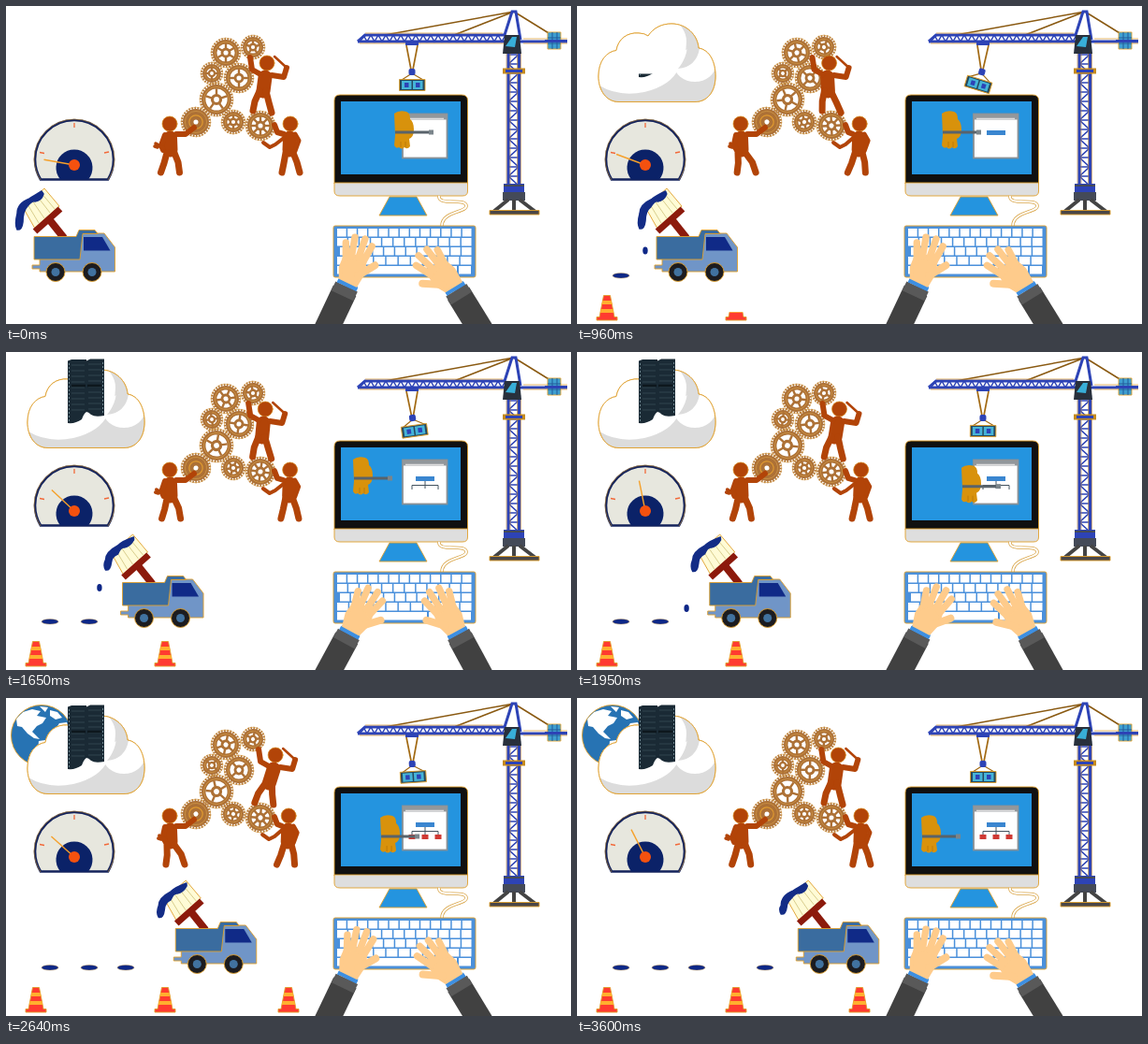
Write an HTML page that moves like this. It is 604 by 340 pixels and loops after 3.63 s.

```html
<!DOCTYPE html>
<html lang="en">
<head>
<meta charset="utf-8">
<title>Under construction</title>
<style>
html, body { margin: 0; width: 100%; height: 100%; overflow: hidden; background: #fff; }
svg { display: block; width: 604px; height: 340px; }
.gold { stroke: #e0a02c; stroke-width: .9; }
.man { stroke: #b24408; fill: none; stroke-linecap: round; stroke-linejoin: round; }
.man circle { fill: #b24408; stroke: #d98a1c; stroke-width: .7; }
</style>
</head>
<body>
<svg viewBox="0 0 604 340">
<defs id="defs">
  <path id="cloudShape" d="M45 102.500C31 102.500 23 90 23 75C23 58 32 49 42 47.500C44 35 54 28 66 29Q72 29 76 32C82 23 91 19 101 19C117 19 129 31 130 45C142 47 148 60 148 75C148 92 139 102.500 126 102.500Z"/>
  <clipPath id="inCloud"><use href="#cloudShape"/></clipPath>
  <clipPath id="inGlobe"><circle cx="38" cy="40" r="32"/></clipPath>
  <g id="cone">
    <path d="M-11 336V332.500H-8L-3.500 309.500H3.500L8 332.500H11V336Z" fill="#ff3b30" class="gold" stroke-width=".5"/>
    <path d="M-4.600 315H4.600L5.500 319H-5.500ZM-6.400 324H6.400L7.200 328H-7.200Z" fill="#ffb02e"/>
  </g>
  <g id="hand" fill="#fecb8b" stroke="#fecb8b" stroke-linecap="round" stroke-linejoin="round">
    <path d="M-8 2L-12 -14L-10 -29L11 -29L13 -14L8 2Z" stroke-width="4"/>
    <path d="M-9 -25L-13 -41M-3.500 -28L-5 -49M4 -28L6 -50M10 -26L15 -44" stroke-width="7.400"/>
    <path d="M8 -10L23 -25" stroke-width="8"/>
  </g>
</defs>

<g id="globe">
  <circle cx="38" cy="40" r="32.500" fill="#2773b3" class="gold"/>
  <g fill="#fff" clip-path="url(#inGlobe)">
    <path d="M11 22L18 15L28 12L37 14L33 19L43 21L39 27L33 30L28 36L32 40L36 44L30 43L23 38L17 31L12 30Z"/>
    <path d="M36 9L45 10L42 15ZM47 13L55 15L60 21L53 23L47 19Z"/>
    <path d="M35 46L42 45L48 52L43 60L38 67L34 56Z"/>
    <path d="M57 27L65 26L69 38L63 46L57 40L53 33Z"/>
  </g>
</g>
<g id="cloud"><use href="#cloudShape" fill="#fff" class="gold"/></g>
<g id="shade">
  <g clip-path="url(#inCloud)">
    <rect x="20" y="15" width="130" height="90" fill="#dcdcdc"/>
    <path d="M20 10H111Q124 42 109 66Q101 85 72 92Q44 98 22 84Z" fill="#fff"/>
    <ellipse cx="126" cy="63" rx="22" ry="18" fill="#fff"/>
    <path d="M109 19C121 32 121 52 108 67Q128 65 131 45Q131 24 109 19Z" fill="#dcdcdc"/>
  </g>
  <use href="#cloudShape" fill="none" class="gold"/>
</g>
<g id="server">
  <path d="M66 9.500L70 8H86V64Q83 66 81 72Q74 77 66 76ZM86 9.500L90 7.500H105V68Q95 70 91 67Q88 64 86 64Z" fill="#1a2a35"/>
  <path id="slats" stroke="#31444f" fill="none"/>
  <path d="M67.500 12V74M103.500 11V66" stroke="#7d98a3" stroke-width=".8" stroke-dasharray="2 2"/>
  <path d="M70 36H85M87 36H102" stroke="#0d171d" stroke-width="2.500"/>
</g>

<path d="M37 185.500A42 42 0 0 1 31 164A42 42 0 0 1 115 164A42 42 0 0 1 109 185.500Z" fill="#e7e7de" stroke="#14235c" stroke-width="2.600"/>
<path d="M37 186A43 43 0 0 1 30 164A43 43 0 0 1 116 164A43 43 0 0 1 109 186" fill="none" stroke="#e0a02c" stroke-width=".5"/>
<path d="M58 185.500A19.500 19.500 0 1 1 88 185.500Z" fill="#0b2268"/>
<path d="M73 125V130M36 156.500L41 157.500M110 156L105 157" stroke="#f26a3a" stroke-width="1.300"/>
<path id="needle" d="M73 170V137" stroke="#f5a02a" stroke-width="1.400"/>
<circle cx="73" cy="170" r="6" fill="#f4510f"/>

<g id="spots" fill="#0d2787" stroke="#c99a4a" stroke-width=".4"></g>
<ellipse id="drop" rx="2.700" ry="4" fill="#0d2787"/>
<g id="truck">
  <path d="M46 228L62 248" stroke="#8c1a0c" stroke-width="8"/>
  <path d="M18 215L41 195L57 214L31 238Z" fill="#fffbd6" class="gold" stroke-width=".6"/>
  <path d="M23 212L35 232M28 208L41 227M33 203L47 221M37 199L52 217" stroke="#cfc27c" stroke-width=".8"/>
  <path d="M31 241L58 217" stroke="#8c1a0c" stroke-width="7"/>
  <path id="paint" fill="#132c86" stroke="#132c86" stroke-width="1.500" stroke-linejoin="round"/>
  <path d="M28 277H36V270H78L80 243H105L116.500 258V284H36V281H28Z" fill="#7095c7" class="gold"/>
  <path d="M30 246.500H75L78 239.500H95L98 243.500H82L79 271H30Z" fill="#3a6c9f" class="gold" stroke-width=".5"/>
  <path d="M83 247H103L111.500 261.500H83Z" fill="#102a87"/>
  <g fill="#1c1c20" class="gold" stroke-width=".5"><circle cx="53" cy="284.500" r="10"/><circle cx="92" cy="284.500" r="10"/></g>
  <g fill="#41729f"><circle cx="53" cy="284.500" r="4.500"/><circle cx="92" cy="284.500" r="4.500"/></g>
</g>
<g id="cone1"><use href="#cone" x="32"/></g>
<g id="cone2"><use href="#cone" x="170"/></g>
<g id="cone3"><use href="#cone" x="302"/></g>

<g id="gears"></g>
<g id="men"></g>

<!-- crane -->
<g fill="none">
  <path d="M543 6L405 31M543 6L479 31M543 6L585 32M540 8L533 32" stroke="#8a5a12" stroke-width="1.500"/>
  <path id="jibWeb" stroke="#2d43b6" stroke-width="1.500"/>
  <path d="M376 38H600M383 31H533L541 6H545L550 36M376 38L384 31" stroke="#2d43b6" stroke-width="3"/>
  <path d="M378 40H533M384 29H531M553 35H600M553 40H600" stroke="#d8962a" stroke-width=".7"/>
  <path id="mastWeb" stroke="#2d43b6" stroke-width="1.600"/>
  <path d="M537 46V192M548.500 46V192" stroke="#2d43b6" stroke-width="3.200"/>
  <path d="M535 50V192M550.500 50V192M539 50V192M546.500 50V192" stroke="#c08a3a" stroke-width=".6"/>
</g>
<path d="M531 66.500H555V72.500H531Z" fill="#c58a1e"/><path d="M534 68H552V71H534Z" fill="#2d43b6"/>
<path d="M533 31H549L551 51H531Z" fill="#28303c"/><path d="M534 43L541 33H546L544 44Z" fill="#38aed8"/>
<path d="M579 28H593V46H579Z" fill="#3f9fd0" class="gold" stroke-width=".5"/>
<path d="M579 34H593M579 40H593M584 28V46M589 28V46" stroke="#235b9a"/>
<path d="M576 37.500H600" stroke="#2d43b6" stroke-width="3"/>
<path d="M532 190H554V208H532Z" fill="#2d43b6"/><path d="M532 192H554M532 200H554V207H532Z" fill="#444a58" stroke="#444a58" stroke-width="2"/>
<path d="M537 207L521 220M549 207L566 220M543 207V220" stroke="#444" stroke-width="4"/>
<path d="M517 218.500H570V223H517Z" fill="#4a4646" class="gold" stroke-width=".5"/>
<path d="M427 38H441V42H427Z" fill="#2d43b6"/>
<path id="cables" stroke="#a26a14" stroke-width="1.700" fill="none"/>
<g id="cargo">
  <path d="M434 72L423 79M434 72L446 79" stroke="#a26a14" stroke-width="1.200"/>
  <rect x="430.500" y="67" width="7" height="7" rx="2" fill="#2d43b6"/>
  <path d="M420.500 78.500H448V90.500H420.500Z" fill="#24485f" class="gold"/>
  <path d="M423 80H433.500V89H423ZM435 80H445.500V89H435Z" fill="#45b4d8"/>
  <path d="M426 82H430.500V87H426ZM438 82H442.500V87H438Z" fill="#2d43b6"/>
</g>

<!-- computer -->
<path d="M351 190V101Q351 95 357 95H487Q493.500 95 493.500 101V190Z" fill="#101010" class="gold" stroke-width=".6"/>
<path d="M351 189H493.500V198Q493.500 203 488 203H357Q351 203 351 198Z" fill="#dedede" class="gold" stroke-width=".6"/>
<rect x="358" y="102" width="128" height="78" fill="#2494df"/>
<path d="M410 204H439L450 224H399Z" fill="#2494df" class="gold"/>
<path d="M463 203C461 214 490 205 492 213C494 221 466 219 466 235" fill="none" stroke="#d9a548" stroke-width="3.400"/>
<path d="M463 203C461 214 490 205 492 213C494 221 466 219 466 235" fill="none" stroke="#fff" stroke-width="1.900"/>
<rect x="424" y="115.500" width="47.500" height="47" fill="#fff" stroke="#8b9196" stroke-width="1.800"/>
<path d="M424 118.500H472" stroke="#92979b" stroke-width="6"/><path d="M427 120.500H468" stroke="#ddd" stroke-width="1.500"/>
<path id="bar" d="M438 133H458V138H438Z" fill="#3a86d0"/>
<g id="tree"><path d="M448 138V146M434 147V142.500H462V147" fill="none" stroke="#43525e"/></g>
<g id="nodes" fill="#cf3a34"><path d="M430.500 146H437.500V151H430.500ZM444.500 146H451.500V151H444.500ZM458.500 146H465.500V151H458.500Z"/></g>
<g id="grip">
  <path d="M-10 -17Q-5 -21 3 -19Q7 -18 7 -11Q11 -8 11 0Q11 8 6 10L7 18Q4 22 1 19Q-2 22 -5 19Q-8 21 -10 17L-9 6Z" fill="#d8920c"/>
  <path d="M-3 13V19M2 13V19" stroke="#b87708" stroke-width=".8"/>
  <path d="M-9 3H28" stroke="#59636b" stroke-width="3"/><path d="M27 .5H32V5.500H27Z" fill="#7b858b"/>
</g>
<rect x="350" y="235" width="152" height="55" rx="2" fill="#4a90db" class="gold"/>
<g id="keys" fill="#fff"></g>
<g id="armL"></g>
<g id="armR" transform="translate(850 0) scale(-1 1)"></g>
</svg>
<script>
const LOOP = 3630, STEP = 30;
const $ = id => document.getElementById(id);
const set = (id, name, value) => $(id).setAttribute(name, value);
const range = n => [...Array(n).keys()];
const clamp = v => Math.max(0, Math.min(1, v));

// Piecewise linear track: time, value, time, value ...
function track(t, k) {
  if (t <= k[0]) return k[1];
  for (let i = 2; i < k.length; i += 2)
    if (t <= k[i]) return k[i - 1] + (k[i + 1] - k[i - 1]) * (t - k[i - 2]) / (k[i] - k[i - 2]);
  return k[k.length - 1];
}

// Bottom-up reveals: id, top, bottom, start, end
const wipes = [
  ['cloud', 18, 104, 180, 420], ['shade', 18, 104, 570, 810],
  ['server', 6, 77, 949, 1125], ['globe', 6, 74, 2010, 2200],
  ['cone1', 308, 337, 390, 580], ['cone2', 308, 337, 900, 1080], ['cone3', 308, 337, 2100, 2290],
  ['tree', 137, 148, 1230, 1410], ['nodes', 145, 152, 2370, 2520]
];
for (const [id] of wipes) {
  $('defs').insertAdjacentHTML('beforeend',
    `<clipPath id="${id}Clip"><rect id="${id}Rect" width="604" height="340"/></clipPath>`);
  set(id, 'clip-path', `url(#${id}Clip)`);
}

const zigzag = (n, point) => 'M' + range(n).map(i => point(i).join(' ')).join('L');
set('jibWeb', 'd', zigzag(39, i => [382 + i * 4, i % 2 ? 38 : 31]));
set('mastWeb', 'd', zigzag(15, i => [i % 2 ? 537 : 548, 52 + i * 10]) +
  range(14).map(i => `M537 ${52 + i * 10}H548`).join(''));
set('slats', 'd', range(9).map(i => `M70 ${14 + i * 6}H84M88 ${13 + i * 6}H102`).join(''));

const rows = [[238, 13, 354], [248, 12, 354], [258, 12, 357], [268, 11, 354]];
let keys = rows.map(([y, n, x]) => {
  const w = (499 - x) / n;
  return range(n).map(i => `<rect x="${x + i * w}" y="${y}" width="${w - 1.5}" height="8.5"/>`).join('');
}).join('');
keys += [[354, 13], [369, 13], [384, 66], [452, 14], [468, 14], [484, 13]]
  .map(([x, w]) => `<rect x="${x}" y="278" width="${w}" height="8.5"/>`).join('');
$('keys').innerHTML = keys;

const gears = [[235, 50, 16, 6], [264, 44, 13, 5], [220, 72, 12, 4], [249, 77, 16, 4],
  [225, 100, 18, 5], [203, 124, 16, 0], [243, 124, 13, 6], [272, 128, 16, 8]];
function gear([x, y, r, holes], i) {
  const ring = (rad, w, dash, color = '#ad7136') =>
    `<circle r="${rad}" fill="none" stroke="${color}" stroke-width="${w}" ${dash ? `pathLength="${dash * 2}" stroke-dasharray="1 1"` : ''}/>`;
  const spokes = range(holes).map(k =>
    `<path d="M0 ${-r * .25}V${-r * .65}" stroke="#ad7136" stroke-width="2.400" transform="rotate(${k * 360 / holes})"/>`).join('');
  const face = holes ? '#fff' : '#ad7136';
  return `<g transform="translate(${x} ${y})"><g id="gear${i}">` +
    ring(r - 1, 2.4, Math.round(r * 1.9)) + ring(r - .2, .6, 0, '#d9a04a') +
    `<circle r="${r - 3}" fill="${face}"/>` + ring(r - 4.2, 4.4) + ring(r - 4.4, .6, 0, '#d9a04a') + spokes +
    `<circle r="${r * .34}" fill="#ad7136"/><circle r="${r * .16}" fill="#fff"/>` +
    (holes ? '' : ring(r * .45, 1.2, 0, '#e09a30')) + '</g></g>';
}
$('gears').innerHTML = gears.map(gear).join('');

// Paint drops: landing time, landing x, fall speed
const drops = [[800, 47, .095], [1240, 89, .095], [2140, 128, .0735], [3380, 201, .095]];
$('spots').innerHTML = drops.map(([, x], i) => `<ellipse id="spot${i}" cx="${x}" cy="288.300" rx="9" ry="2.800"/>`).join('');

const line = (d, w) => `<path d="${d}" stroke-width="${w}"/>`;
const man = (x, y, body) => `<g class="man"><circle cx="${x}" cy="${y}" r="8"/>${body}</g>`;

function drawMen(t) {
  const s = -track(t, [0, 0, 907, 1, 2722, -1, LOOP, 0]), k = Math.abs(s);
  const x = 10 * s, f = 2 * s, a = 6 * k, b = -6 * k, h = -2 * k;
  const top = line(`M${277 + x} 76L${275 + x * .7} 91`, 15) +
    line(`M${272 + x} 73L${263 + x} 68L${261 + x} 55`, 6) +
    line(`M${284 + x} 74L${297 + x} 76L${300 + x} 66`, 6) +
    line(`M${299 + x} 65L${287 + x} 54`, 2.5) +
    line(`M${271 + x * .7} 91L${266 + x * .4} 102L${264 + f} 112`, 7) +
    line(`M${278 + x * .7} 91L${281 + x * .4} 103L${284 + f} 114`, 7);
  const left = line('M175.500 141L176 154', 15) +
    line('M182 137L192 137L201 130', 6) +
    line(`M170 138L${166 + a * .3} 149L${168 + a * .5} 154`, 6) +
    line(`M${160 + a * .7} 147L${168 + a * .5} 152M${159 + a * .7} 150l3 1`, 3.5) +
    line(`M172 157L${169 + a * .6} 168L${165.5 + a} 178`, 7) +
    line(`M180 157L${184 + a * .6} 167L${185.5 + a} 178`, 7);
  const right = line(`M${303.5 + h} 141L${303 + h} 154`, 15) +
    line(`M${297 + h} 137L290 135L287 127`, 6) +
    line(`M${309 + h} 137L${313 + h} 144L${309 + h} 155`, 5) +
    line(`M${297 + h} 141L${288 + h * .5} 148L${282 + h * .5} 151L${275 + h * .5} 146`, 4) +
    line(`M${299 + h} 157L${297 + b * .6} 168L${295 + b} 178`, 7) +
    line(`M${307 + h} 157L${311 + b * .6} 167L${314 + b} 178`, 7);
  $('men').innerHTML = man(279 + x, 61, top) + man(175, 126, left) + man(304 + h, 126, right);
}

function drawArm(id, p) {
  const wx = 366 + 5 * p, wy = 296 + 4 * p;
  const dx = wx - 342, dy = wy - 347;
  const part = (from, to, w, color) =>
    `<path d="M${342 + dx * from} ${347 + dy * from}L${342 + dx * to} ${347 + dy * to}" stroke="${color}" stroke-width="${w}"/>`;
  $(id).innerHTML = part(.9, 1.01, 22, '#3d8fe2') +
    `<use href="#hand" transform="translate(${wx} ${wy}) rotate(${14 + 28 * p})"/>` +
    part(-.3, .84, 27, '#414141') + part(.73, .92, 26, '#595959') + part(.92, .99, 23, '#3d8fe2');
}

function draw(t) {
  for (const [id, top, bottom, from, to] of wipes)
    set(id + 'Rect', 'y', bottom - (bottom - top) * clamp((t - from) / (to - from)) + (t < from ? 400 : 0));

  const speed = .0573;
  set('truck', 'transform', `translate(${t * speed} 0)`);
  const w = track(t, [0, 0, 540, 1, 960, .4, 1650, 1, 2250, .8, 3000, 1, 3600, 0]);
  const tail = track(t, [0, 239, 540, 234, 960, 238, 1650, 233, 2250, 236, 3000, 233, 3600, 231]);
  set('paint', 'd', `M${38 + 4 * w} 198Q30 ${203 - w} 25 ${206 + w}Q12 ${211 + 3 * w} 12 222` +
    `Q9 ${tail - 5} 12 ${tail}Q17 ${tail + 1} 18 ${tail - 8}Q18 219 ${23 + 2 * w} ${214 + 2 * w}Q28 208 ${31 + w} 209Q38 208 ${40 + 2 * w} 201Z`);

  set('drop', 'visibility', 'hidden');
  drops.forEach(([land, x, fall], i) => {
    const left = land - t, y = 288 - left * fall;
    set('spot' + i, 'visibility', left <= 0 ? 'visible' : 'hidden');
    if (left > 0 && y > 236) {
      set('drop', 'cx', x - left * speed);
      set('drop', 'cy', y);
      set('drop', 'visibility', 'visible');
    }
  });

  const angle = track(t, [0, -80, 350, 80, 540, 7, 930, -80, 1390, 80, 1650, -47, 1740, -80,
    2230, 80, 2250, 76, 2740, -80, 3000, -9, 3270, 80, 3600, -27]);
  set('needle', 'transform', `rotate(${angle} 73 170)`);

  gears.forEach((g, i) => set('gear' + i, 'transform', `rotate(${(i % 2 ? -1 : 1) * 180 * t / LOOP})`));
  drawMen(t);

  const sway = track(t, [0, 0, 300, -8, 540, -4, 960, 17, 1300, 2, 1650, -8, 2250, 9, 2600, -4, 3000, 0]);
  const hook = -sway * .06;
  set('cables', 'd', `M428 42L${433 + hook} 68M440 42L${435 + hook} 68`);
  set('cargo', 'transform', `translate(${hook} 0) rotate(${sway} 434 70)`);

  const gx = track(t, [0, 425, 540, 410, 960, 400, 1650, 381, 2100, 441, 2250, 434, 3000, 388, 3600, 378]);
  set('grip', 'transform', `translate(${gx} ${track(t, [1650, 132, 2100, 145])})`);
  set('bar', 'visibility', t >= 270 ? 'visible' : 'hidden');

  const p = track(t, [0, 0, 450, 1, 600, 1, 900, 0, 1020, 0, 1350, 1, 1650, .5, 1800, 0,
    2180, 1, 2320, 1, 2620, 0, 2940, 1, 3120, 1, 3540, 0]);
  drawArm('armL', p);
  drawArm('armR', 1 - p);
}

const start = performance.now();
function tick() {
  const t = (performance.now() - start) % LOOP;
  draw(Math.floor(t / STEP) * STEP);
  requestAnimationFrame(tick);
}
tick();
</script>
</body>
</html>
```
